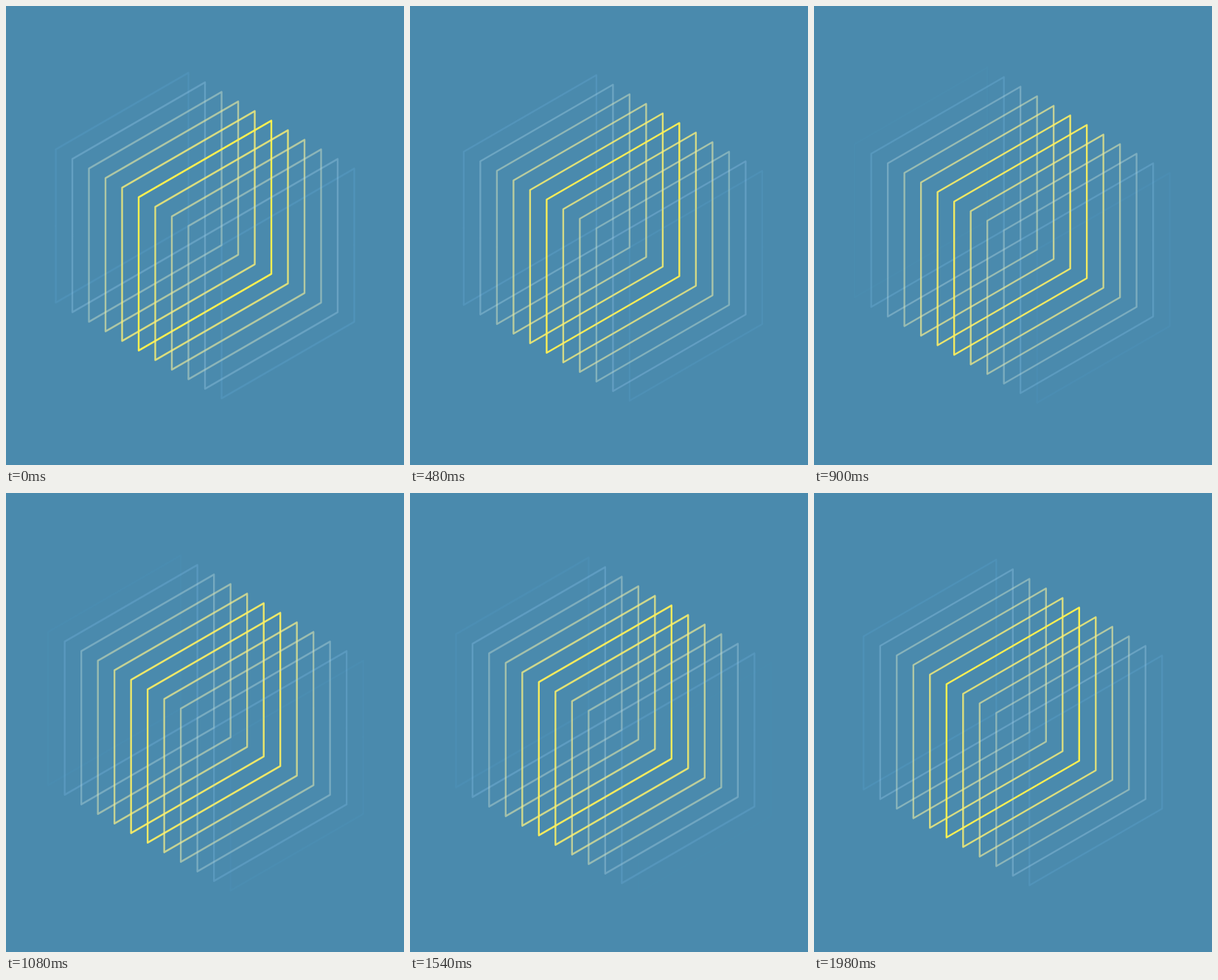
Write an HTML page with a canvas that moves like this. It is 540 px wide and 623 px high and loops after 2000 ms.

```html
<!DOCTYPE html>
<html lang="en">
<head>
<meta charset="utf-8">
<title>Drifting frames</title>
<style>
html, body { margin: 0; width: 100%; height: 100%; overflow: hidden; background: #4a8aad; }
canvas { display: block; }
</style>
</head>
<body>
<canvas id="stage" width="540" height="623"></canvas>
<script>
const ctx = document.getElementById('stage').getContext('2d');
const LOOP = 2000;
const STEP = { x: 22.5, y: 13 };
const REACH = 5.75;
const PEAK = 0.06;

// Yellow in the middle, turning pale blue and transparent towards the ends.
function strokeFor(d) {
  const u = Math.abs(d - PEAK) / REACH;
  if (u >= 1) return null;
  const r = 255 - 180 * u * u;
  const g = 241 - 60 * u * u;
  const b = Math.min(250, 77 + 235 * u);
  return `rgba(${r}, ${g}, ${b}, ${1 - u})`;
}

function drawFrame(d) {
  const style = strokeFor(d);
  if (!style) return;
  const x = 270 + d * STEP.x;
  const y = 311.6 + d * STEP.y;
  ctx.strokeStyle = style;
  ctx.beginPath();
  ctx.moveTo(x - 90, y - 52);
  ctx.lineTo(x + 90, y - 156);
  ctx.lineTo(x + 90, y + 52);
  ctx.lineTo(x - 90, y + 156);
  ctx.closePath();
  ctx.stroke();
}

function render(now) {
  const shift = (now % LOOP) / LOOP;
  ctx.fillStyle = '#4a8aad';
  ctx.fillRect(0, 0, 540, 623);
  ctx.lineWidth = 2.4;
  ctx.lineJoin = 'round';
  for (let k = -6; k <= 5; k++) drawFrame(k + shift);
}

const start = performance.now();
function tick() {
  render(performance.now() - start);
  requestAnimationFrame(tick);
}
tick();
</script>
</body>
</html>
```
